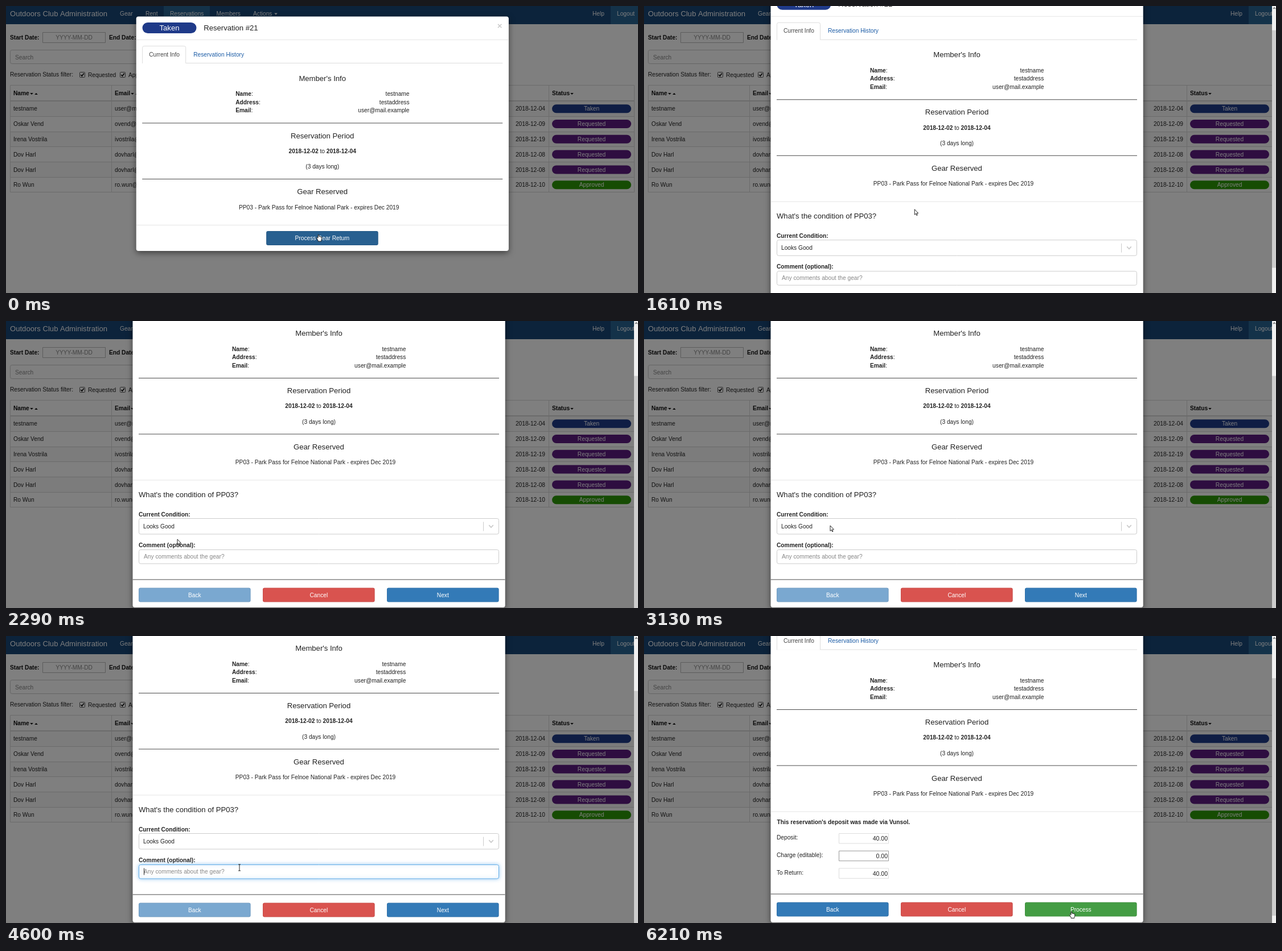
An HTML page with a canvas for the animation above (8000 ms loop, 1110x505 px).

```html
<!DOCTYPE html>
<html lang="en">
<head>
<meta charset="utf-8">
<title>Gear return</title>
<style>
html, body { margin: 0; height: 100%; overflow: hidden; }
canvas { display: block; }
</style>
</head>
<body>
<canvas width="1110" height="505"></canvas>
<script>
const ctx = document.querySelector('canvas').getContext('2d');
const LOOP = 8000, SMALL = 10.2, LARGE = 13.1;
const BLUE = '#337ab7', BLUE_HOVER = '#286090', BLUE_ACTIVE = '#204d74';

// Pointer and scroll waypoints: time, x, y, scroll, number of steps to get there
const PATH = [
  [0, 548, 402, 0, 1],
  [1250, 548, 402, 0, 1],
  [1730, 451, 343, 55, 4],
  [1870, 426, 328, 68.5, 1],
  [2150, 343, 365, 104.5, 2],
  [2290, 301, 384, 105.5, 1],
  [3010, 334, 362, 105.5, 6],
  [3130, 327, 360, 105.5, 1],
  [3750, 327, 360, 105.5, 1],
  [4350, 400, 400, 105.5, 5],
  [4480, 400, 400, 105.5, 1],
  [4960, 440, 408, 105.5, 4],
  [5100, 779, 451, 105.5, 1],
  [5240, 760, 476, 105.5, 1],
  [5360, 752, 484.5, 105.5, 1],
  [6210, 750, 484.5, 76.5, 1],
  [LOOP, 750, 484.5, 76.5, 1]
];

const RESERVATIONS = [
  ['testname', 'user@mail.example', '04', 'Taken'],
  ['Oskar Vend', 'ovend@mail.example', '09', 'Requested'],
  ['Irena Vostrila', 'ivostrila@mail.example', '19', 'Requested'],
  ['Dov Harl', 'dovharl@mail.example', '08', 'Requested'],
  ['Dov Harl', 'dovharl@mail.example', '08', 'Requested'],
  ['Ro Wun', 'ro.wun@mail.example', '10', 'Approved']
];
const STATUS_COLORS = { Taken: '#1f3a89', Requested: '#5c1a80', Approved: '#2d9a06' };

const ARROW = new Path2D('M0 0V9.5L2.2 7.5 3.6 10.8 5 10.2 3.6 7 6.4 6.8Z');
const HAND = new Path2D('M0 .7V6.2L-1.6 5-2.6 6 0 10.5V12H5.8V10.2L6.6 8V4.6L1.7 3.4V.7Z');
const IBEAM = new Path2D('M-2 0H2M0 0V11M-2 11H2');

function stateAt(t) {
  const i = PATH.findIndex(p => p[0] > t);
  const a = PATH[i - 1], b = PATH[i];
  const k = Math.floor((t - a[0]) / (b[0] - a[0]) * b[4]) / b[4];
  const [x, y, scroll] = [1, 2, 3].map(n => a[n] + (b[n] - a[n]) * k);
  return { x, y, scroll };
}

// Draws text around the middle line y and returns its width
function text(str, x, y, { size = SMALL, color = '#222', bold = false, align = 'left' } = {}) {
  ctx.font = `${bold ? 'bold ' : ''}${size}px "Liberation Sans", Arial, sans-serif`;
  ctx.fillStyle = color;
  ctx.textAlign = align;
  ctx.fillText(str, x, y + size * 0.355);
  return ctx.measureText(str).width;
}

function rect(x, y, w, h, color) {
  ctx.fillStyle = color;
  ctx.fillRect(x, y, w, h);
}

function box(x, y, w, h, fill, stroke, radius = 0, lineWidth = 1) {
  ctx.beginPath();
  ctx.roundRect(x, y, w, h, radius);
  if (fill) { ctx.fillStyle = fill; ctx.fill(); }
  if (stroke) { ctx.strokeStyle = stroke; ctx.lineWidth = lineWidth; ctx.stroke(); }
}

function caret(x, y, color, dir = 1) {
  ctx.beginPath();
  ctx.moveTo(x - 2.8, y - 1.4 * dir);
  ctx.lineTo(x + 2.8, y - 1.4 * dir);
  ctx.lineTo(x, y + 1.5 * dir);
  ctx.fillStyle = color;
  ctx.fill();
}

function chevron(x, y, w, h, color, lineWidth) {
  ctx.beginPath();
  ctx.moveTo(x - w, y - h);
  ctx.lineTo(x, y + h);
  ctx.lineTo(x + w, y - h);
  ctx.strokeStyle = color;
  ctx.lineWidth = lineWidth;
  ctx.stroke();
}

function pill(label, x, y, w, h, size) {
  box(x, y, w, h, STATUS_COLORS[label], null, h / 2);
  text(label, x + w / 2, y + h / 2, { size, color: '#fff', align: 'center' });
}

function button(label, x, y, color) {
  box(x, y, 196.6, 25, color, null, 3);
  box(x + 0.4, y + 0.4, 195.8, 24.2, null, 'rgba(0,0,0,.1)', 3, 0.8);
  text(label, x + 98.3, y + 12.5, { color: '#fff', align: 'center' });
}

function checkbox(x, label) {
  box(x + 0.5, 116.5, 9, 9, '#fff', '#555', 1);
  ctx.beginPath();
  ctx.moveTo(x + 2.3, 121);
  ctx.lineTo(x + 4.3, 123.2);
  ctx.lineTo(x + 7.8, 118.5);
  ctx.strokeStyle = '#000';
  ctx.lineWidth = 1.5;
  ctx.stroke();
  text(label, x + 15, 121);
}

function drawPage() {
  const white = { color: '#fff' }, head = { color: '#111', bold: true };
  const line = '#d8d8d8', hint = { color: '#888' };
  rect(0, 0, 1110, 505, '#fff');
  rect(0, 0, 1110, 32, '#194677');
  rect(277, 0, 81, 32, '#286494');
  rect(1062, 0, 48, 32, '#286494');
  text('Outdoors Club Administration', 7, 13.5, { size: LARGE, ...white });
  [['Gear', 200], ['Rent', 245], ['Reservations', 288], ['Members', 369.5],
   ['Actions', 434], ['Help', 1030], ['Logout', 1073]]
    .forEach(([label, x]) => text(label, x, 13.5, white));
  caret(474, 14, '#fff');

  text('Start Date:', 7, 55.5, head);
  text('End Date:', 181, 55.5, head);
  box(64.5, 46.5, 110, 18, null, '#bbb');
  text('YYYY-MM-DD', 119.5, 55.5, { ...hint, align: 'center' });
  box(7.5, 77.5, 300, 24, null, '#ccc', 3);
  text('Search', 16, 90, hint);
  text('Reservation Status filter:', 7, 120.5);
  checkbox(129, 'Requested');
  checkbox(200, 'Approved');

  const rowY = i => 167 + 26.8 * i;
  RESERVATIONS.forEach(([name, email, day, status], i) => {
    const top = Math.round(rowY(i)), mid = rowY(i) + 13.7;
    if (i % 2 === 0) rect(7, top, 1097, 27, '#f9f9f9');
    rect(7, top - (i ? 0 : 1), 1097, i ? 1 : 2, line);
    text(name, 13, mid);
    text(email, 191, mid);
    text('2018-12-' + day, 947, mid, { align: 'right' });
    pill(status, 959, mid - 7.5, 139, 15);
  });
  box(7.5, 139.5, 1096, 188, null, line);
  rect(185, 140, 1, 188, line);
  rect(953, 140, 1, 188, line);
  text('Name', 13, 153.5, head);
  text('Email', 191, 153.5, head);
  text('Status', 959, 153.5, head);
  [45, 222, 994].forEach(x => caret(x, 154.5, '#111'));
  [53, 230].forEach(x => caret(x, 154.5, '#111', -1));
  rect(0, 0, 1110, 505, 'rgba(0,0,0,.5)');
}

function drawInfo() {
  const title = { size: LARGE, align: 'center' };
  pill('Taken', 233.3, 29, 95, 19, LARGE);
  text('Reservation #21', 341, 38, { size: LARGE });
  text('×', 861, 34.5, { size: 15, bold: true, color: '#ccc', align: 'center' });
  rect(223, 59, 653, 1, '#e5e5e5');
  rect(233, 100, 633, 1, '#ddd');
  box(233.5, 70.5, 76, 31, '#fff', '#ddd', [3, 3, 0, 0]);
  rect(232, 101, 79, 2, '#fff');
  rect(234, 100, 75, 1, '#fff');
  text('Current Info', 245, 85, { color: '#444' });
  text('Reservation History', 323, 85, { color: '#1c5ca6' });

  text("Member's Info", 549.5, 127, title);
  [['Name', 'testname'], ['Address', 'testaddress'], ['Email', 'user@mail.example']]
    .forEach(([label, value], i) => {
      const y = 154.5 + 14.6 * i;
      text(':', 397 + text(label, 397, y, { bold: true }), y);
      text(value, 702.3, y, { align: 'right' });
    });
  rect(233, 205.5, 633, 1, '#4a4a4a');
  text('Reservation Period', 549.5, 228, title);
  let x = 490.3;
  x += text('2018-12-02', x, 255.3, { bold: true });
  x += text(' to ', x, 255.3);
  text('2018-12-04', x, 255.3, { bold: true });
  text('(3 days long)', 549.5, 282.5, { align: 'center' });
  rect(233, 304, 633, 1, '#4a4a4a');
  text('Gear Reserved', 549.5, 326.5, title);
  text('PP03 - Park Pass for Felnoe National Park - expires Dec 2019', 543.5, 354, { align: 'center' });
  rect(223, 385, 653, 1, '#e5e5e5');
}

function drawMenu() {
  ctx.save();
  ctx.shadowColor = 'rgba(0,0,0,.2)';
  ctx.shadowBlur = 6;
  box(233, 337, 633, 110, '#fff', null, 3);
  ctx.restore();
  rect(233, 340, 633, 26, '#2684ff');
  ['Looks Good', 'Needs Repair', 'Not Usable', 'Unknown'].forEach((label, i) =>
    text(label, 241.5, 353 + 26.2 * i, { color: i ? '#222' : '#fff' }));
}

function drawCondition(t, pointer) {
  const selecting = t >= 3380 && t < 4600;
  const commenting = t >= 4600 && t < 5840;
  text("What's the condition of PP03?", 233, 410.5, { size: LARGE });
  text('Current Condition:', 233, 445.5, { bold: true });
  box(233.5, 453, 632, 27.5, '#fff', selecting ? '#2684ff' : '#ccc', 3, selecting ? 1.7 : 1);
  text('Looks Good', 241, 466.5);
  rect(838, 459, 1, 16, '#ccc');
  chevron(852, 466.7, 3.8, 2, selecting ? '#555' : '#ccc', 1.7);

  text('Comment (optional):', 233, 500, { bold: true });
  ctx.save();
  if (commenting) {
    ctx.shadowColor = 'rgba(102,175,233,.7)';
    ctx.shadowBlur = 6;
  }
  box(233.5, 508, 632, 24.5, '#fff', commenting ? '#66afe9' : '#ccc', 3);
  ctx.restore();
  text('Any comments about the gear?', 242, 520, { color: '#888' });
  if (commenting && t < 5100) rect(242, 514, 1, 12, '#222');

  rect(222.5, 560, 654, 1, '#4a4a4a');
  button('Back', 233, 575, '#7aa8d0');
  button('Cancel', 451, 575, '#d9534f');
  const hovered = pointer.y > 469;
  button('Next', 669, 575, t >= 5840 ? BLUE_ACTIVE : hovered ? BLUE_HOVER : BLUE);
  if (t >= 3380 && t < 3870) drawMenu();
}

function drawDeposit() {
  text("This reservation's deposit was made via Vunsol.", 233.5, 403.7, { bold: true });
  [['Deposit:', '40.00'], ['Charge (editable):', '0.00'], ['To Return:', '40.00']]
    .forEach(([label, value], i) => {
      const y = 424 + 30.7 * i;
      text(label, 233, y + 7);
      box(342.5, y, 87, 17.5, '#fff', i === 1 ? '#999' : '#ddd');
      text(value, 428, y + 9.2, { size: 10.5, align: 'right' });
    });
  rect(222.5, 530, 654, 1, '#4a4a4a');
  button('Back', 233, 545, BLUE);
  button('Cancel', 451, 545, '#d9534f');
  button('Process', 669, 545, '#449d44');
}

function drawModal(t, pointer) {
  const bottom = t < 620 ? 431 : t < 6210 ? 609.5 : 580.5;
  ctx.save();
  ctx.translate(t < 620 ? 6.2 : 0, -pointer.scroll);
  ctx.save();
  ctx.shadowColor = 'rgba(0,0,0,.5)';
  ctx.shadowBlur = 11;
  ctx.shadowOffsetY = 3.6;
  box(222.5, 18.5, 654.2, bottom - 18.5, '#fff', null, 4);
  ctx.restore();
  drawInfo();
  if (t < 620) button('Process Gear Return', 450.9, 396, t < 250 ? BLUE_HOVER : BLUE_ACTIVE);
  else if (t < 6210) drawCondition(t, pointer);
  else drawDeposit();
  ctx.restore();
}

function drawScrollbar(t, scroll) {
  rect(1103, 0, 7, 505, '#f0f0f0');
  rect(1103, 8 + scroll * (t < 6210 ? 0.84 : 0.865), 7, 418, '#cdcdcd');
  chevron(1107, 4, 2, -1.2, '#555', 1.1);
}

function drawPointer(t, { x, y }) {
  ctx.save();
  ctx.translate(x, y);
  ctx.strokeStyle = '#111';
  ctx.lineWidth = 0.9;
  if (t >= 4600 && t < 5100) {
    ctx.stroke(IBEAM);
  } else {
    const shape = t < 620 || t >= 5240 ? HAND : ARROW;
    ctx.fillStyle = '#fff';
    ctx.fill(shape);
    ctx.stroke(shape);
  }
  ctx.restore();
}

function render(now) {
  const t = now % LOOP;
  const pointer = stateAt(t);
  drawPage();
  drawModal(t, pointer);
  if (t >= 620) drawScrollbar(t, pointer.scroll);
  drawPointer(t, pointer);
}

const start = performance.now();
function tick() {
  render(performance.now() - start);
  requestAnimationFrame(tick);
}
tick();
</script>
</body>
</html>
```
